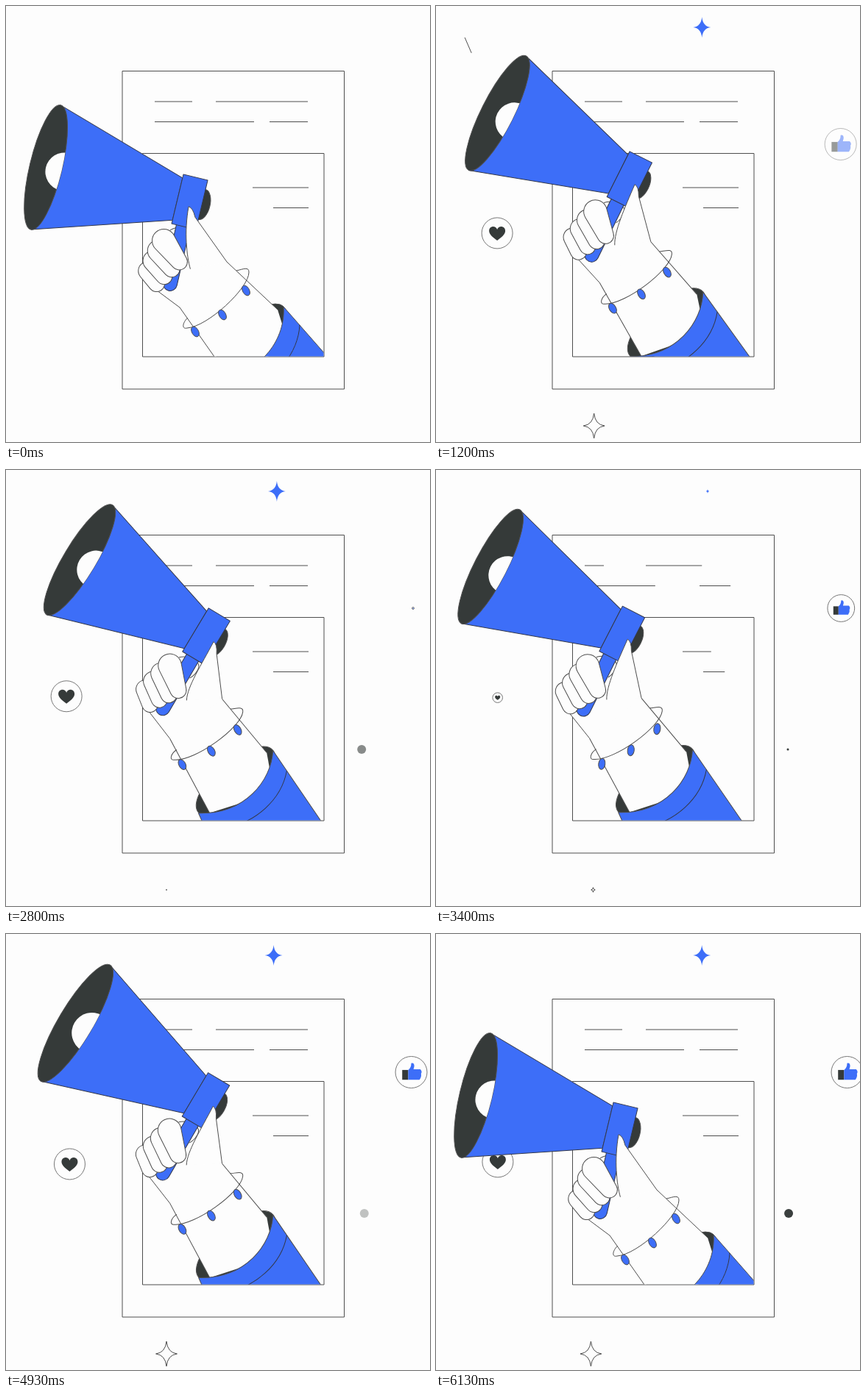
These frames come from a looping animation (576 px wide and 593 px high, 6.19 s). An HTML page with a canvas:

```html
<!DOCTYPE html>
<html lang="en">
<head>
<meta charset="utf-8">
<title>Announcement</title>
<style>
html, body { margin: 0; width: 100%; height: 100%; overflow: hidden; background: #fdfdfd; }
canvas { display: block; }
</style>
</head>
<body>
<canvas id="stage" width="576" height="593"></canvas>
<script>
const ctx = document.getElementById('stage').getContext('2d');
const LOOP = 6190, STEP = 200 / 3, TAU = Math.PI * 2, RAD = Math.PI / 180;
const BG = '#fdfdfd', LINE = '#4e4e4e', DARK = '#353a39', BLUE = '#3d6ef8', INK = '#33384a';

// Megaphone x, y, angle and forearm x, y, angle
const REST = [241, 229, 0, 294, 420, 0];
const LOW = [263, 198, 13.2, 279, 392, 5.5];
const HIGH = [287, 183, 20, 284, 377, 7.5];
// Lift over time: 0 at rest, 1 low, 2 high
const LIFT = [[270, 0], [1150, 1], [2200, 2], [3400, 1.06], [3800, 1.06], [5400, 1.6], [6100, 0]];
const SHOUTS = [900, 1750, 4130, 5000];

// Each icon fades in at start, drifts by dx, dy (furthest at peak) and shrinks away around gap
const ICONS = [
  { shape: blueStar, x: 365, y: 29, r: 14, dx: 4, dy: 0, period: 5000, peak: 3400, start: 270, gap: 3650, width: 900 },
  { shape: lineStar, x: 214, y: 571, r: 17, dx: 4, dy: 0, period: 2100, peak: 4930, start: 270, gap: 2980, width: 1500 },
  { shape: heart, x: 84, y: 310, r: 21, dx: 2.5, dy: 3, period: 5200, peak: 4800, start: 270, gap: 3698, width: 785 },
  { shape: thumbUp, x: 554, y: 188, r: 21.5, dx: 4.5, dy: 0, period: 1930, peak: 2250, start: 900, gap: 2640, width: 1000 },
  { shape: dot, x: 483, y: 380, r: 6, dx: 5, dy: 0, period: 2450, peak: 2200, start: 1500, gap: 3609, width: 635 }
];

// x, y, width
const TEXT_LINES = [
  [202, 130, 51], [285, 130, 125], [202, 157.5, 135],
  [358, 157.5, 52], [335, 247, 76], [363, 274.5, 48]
];

const clamp = v => Math.max(0, Math.min(1, v));
const smooth = v => { const u = clamp(v); return u * u * (3 - 2 * u); };
const bump = (t, centre, width) => Math.exp(-(((t - centre) / width) ** 2));
const wave = (t, peak, period) => Math.cos(TAU * (t - peak) / period);

function liftAt(t) {
  return LIFT.slice(1).reduce((v, [end, to], i) => {
    const [from, was] = LIFT[i];
    return v + (to - was) * smooth((t - from) / (end - from));
  }, 0);
}

// Quadratic path through the three poses
function poseAt(lift) {
  const a = (1 - lift) * (2 - lift) / 2, b = lift * (2 - lift), c = lift * (lift - 1) / 2;
  return REST.map((v, i) => a * v + b * LOW[i] + c * HIGH[i]);
}

function paint(fill, stroke = LINE) {
  if (fill) { ctx.fillStyle = fill; ctx.fill(); }
  if (stroke) { ctx.strokeStyle = stroke; ctx.stroke(); }
}

function ellipse(x, y, rx, ry, angle = 0) {
  ctx.beginPath();
  ctx.ellipse(x, y, rx, ry, angle, 0, TAU);
}

function poly(points) {
  ctx.beginPath();
  points.forEach(p => ctx.lineTo(...p));
}

function curve(start, ...beziers) {
  ctx.beginPath();
  ctx.moveTo(...start);
  beziers.forEach(b => ctx.bezierCurveTo(...b));
}

function capsule(x1, y1, r1, x2, y2, r2) {
  const a = Math.atan2(y2 - y1, x2 - x1);
  const off = Math.acos((r1 - r2) / Math.hypot(x2 - x1, y2 - y1));
  ctx.beginPath();
  ctx.arc(x1, y1, r1, a + off, a - off + TAU);
  ctx.arc(x2, y2, r2, a - off, a + off);
  ctx.closePath();
}

// A rigid part: maps points and draws in its own space
function part(x, y, deg) {
  const a = deg * RAD, c = Math.cos(a), s = Math.sin(a);
  return {
    a,
    at: (px, py) => [x + px * c - py * s, y + px * s + py * c],
    draw(fn) {
      ctx.save();
      ctx.translate(x, y);
      ctx.rotate(a);
      fn();
      ctx.restore();
    }
  };
}

function star(r) {
  const w = r * .85, c = r * .09;
  ctx.beginPath();
  ctx.moveTo(0, -r);
  ctx.quadraticCurveTo(c, -c, w, 0);
  ctx.quadraticCurveTo(c, c, 0, r);
  ctx.quadraticCurveTo(-c, c, -w, 0);
  ctx.quadraticCurveTo(-c, -c, 0, -r);
  ctx.closePath();
}

function blueStar(r) { star(r); paint(BLUE, null); }
function lineStar(r) { star(r); paint(null); }

function dot(r, t) {
  ctx.globalAlpha *= .65 + .35 * wave(t, 3565, 2730);
  ellipse(0, 0, r, r);
  paint(DARK, null);
}

function badge(r) {
  ellipse(0, 0, r, r);
  paint(BG, '#777');
  ctx.scale(r / 21, r / 21);
}

function heart(r) {
  badge(r);
  curve([0, 10], [-5, 6, -11, 2, -11, -3], [-11, -10, -2, -11, 0, -5],
    [2, -11, 11, -10, 11, -3], [11, 2, 5, 6, 0, 10]);
  paint(DARK, null);
}

function thumbUp(r) {
  badge(r);
  ctx.fillStyle = DARK;
  ctx.fillRect(-12, -3, 8, 13);
  ctx.beginPath();
  ctx.moveTo(-4, -3);
  ctx.quadraticCurveTo(0, -6, 0, -12);
  ctx.quadraticCurveTo(4, -13, 4, -8);
  ctx.lineTo(3, -4);
  ctx.lineTo(12, -4);
  ctx.quadraticCurveTo(15, -1, 13, 2);
  ctx.quadraticCurveTo(14, 6, 11, 10);
  ctx.lineTo(-4, 10);
  ctx.closePath();
  paint(BLUE, null);
}

function drawPaper(t) {
  ctx.strokeStyle = LINE;
  ctx.strokeRect(158, 88.5, 301.5, 432.5);
  ctx.strokeRect(185.5, 200.5, 246.5, 276.5);
  TEXT_LINES.forEach(([x, y, w], i) => {
    const late = t - i % 4 * 50;
    const shown = 1 - clamp((late - 3155) / 500) + clamp((late - 3700) / 250);
    poly([[x, y], [x + w * shown, y]]);
    if (shown > 0) paint(null);
  });
}

function drawIcons(t) {
  for (const { shape, x, y, r, dx, dy, period, peak, start, gap, width } of ICONS) {
    const size = r * smooth(Math.abs(t - gap) / width);
    const alpha = clamp((t - start) / 600);
    if (size < .3 || !alpha) continue;
    const drift = wave(t, peak, period);
    ctx.save();
    ctx.globalAlpha = alpha;
    ctx.translate(x + dx * drift, y + dy * drift);
    shape(size, t);
    ctx.restore();
  }
}

function drawForearm(charm) {
  ellipse(38, 37, 66, 28, -47 * RAD);
  paint(DARK);
  poly([[6, -72], [75, -7], [85, 25], [60, 60], [8, 84], [-58, -10]]);
  paint(BG, null);
  poly([[6, -72], [75, -7]]);
  paint(null);
  poly([[-58, -10], [8, 84]]);
  paint(null);

  curve([83, -11], [86, 30, 56, 80, -7, 86]);
  ctx.lineTo(53, 186);
  ctx.lineTo(233, 160);
  ctx.closePath();
  paint(BLUE);
  curve([105, 14], [103, 50, 76, 92, 15, 108]);
  paint(null, INK);

  curve([-47, 4], [-54, 10, -56, 20, -48, 18], [-20, 16, 36, -36, 36, -58], [36, -66, 28, -62, 19, -60]);
  paint(null);
  for (const [x, y] of [[-37, 23], [0, 0], [32, -33]]) {
    ellipse(x, y, 7.5, 4.5, charm);
    paint(BLUE);
  }
}

function drawMegaphone(k) {
  ellipse(34, 34, 11, 21);
  paint(DARK);
  // skin between index finger and thumb
  curve([0, 78], [8, 70, 26, 66, 30, 76], [32, 82, 30, 90, 27, 95]);
  paint(BG);
  capsule(16, 60, 9.5, 17, 149, 9.5);
  paint(BLUE, INK);

  const bx = -184 * (1 + k / 2), grow = 1 + k, ry = 87 * grow;
  poly([[0, 5], [bx + 5, 34 - ry * .98], [bx, 34 + ry], [0, 64]]);
  ctx.closePath();
  paint(BLUE, INK);
  ellipse(bx, 34, 22 * grow, ry);
  paint(DARK);
  ctx.save();
  ctx.clip();
  ellipse(bx + 26, 34, 26 * grow, 26 * grow);
  paint(BG, null);
  ctx.restore();

  ctx.beginPath();
  ctx.rect(0, 0, 34, 69);
  paint(BLUE, INK);
}

function drawFingers() {
  for (let i = 0; i < 4; i++) {
    capsule(-17 + 4 * i, 139 - 15 * i, 12.5 + 1.1 * i, -1 + 7.7 * i, 153 - 12 * i, 11);
    paint(BG);
  }
}

function drawThumb(mega, x, y, wrist) {
  const { at } = mega;
  curve(at(39, 123), [...at(30, 107), ...at(x + 2, y + 35), ...at(x, y)]);
  ctx.quadraticCurveTo(...at(x + 6, y), ...at(x + 12, y + 12));
  ctx.lineTo(...wrist);
  paint(BG);
}

function drawRays(t, mega, k) {
  const [cx, cy] = mega.at(-184 * (1 + k / 2), 34);
  for (const start of SHOUTS) {
    const u = (t - start - 60) / 330;
    if (u <= 0 || u >= 1) continue;
    [40, 13, -13, -40].forEach((deg, i) => {
      const v = u + (i ? .3 : 0);
      if (v >= 1) return;
      const a = mega.a + Math.PI + deg * RAD;
      const tail = 70 + 42 * clamp(2 * v - 1), head = 70 + 42 * clamp(v * 1.5);
      poly([tail, head].map(d => [cx + d * Math.cos(a), cy + d * Math.sin(a)]));
      paint(null);
    });
  }
}

function drawFigure(t) {
  const [mx, my, turn, fx, fy, bend] = poseAt(liftAt(t));
  const shake = bump(t, 3400, 300);
  const mega = part(mx - 11 * shake, my - 11.5 * shake, 13.4 + turn);
  const arm = part(fx - 14 * shake, fy - 9.5 * shake, bend + shake);
  const k = SHOUTS.reduce((sum, s) => sum + .115 * bump(t, s, 80), 0);
  const tipX = 17 + .7 * turn, tipY = 41 - .3 * turn;
  const wrist = arm.at(6, -72), heel = arm.at(-58, -10), grip = mega.at(-3, 160);

  ctx.save();
  ctx.beginPath();
  ctx.rect(-10, -10, 441.5, 486.5);
  ctx.clip();
  arm.draw(() => drawForearm((60 + 38 * shake) * RAD - arm.a));
  poly([mega.at(-5, 94), mega.at(tipX, tipY), wrist, heel, grip]);
  paint(BG, null);
  poly([grip, heel]);
  paint(null);
  mega.draw(() => { drawMegaphone(k); drawFingers(); });
  drawThumb(mega, tipX, tipY, wrist);
  ctx.restore();
  drawRays(t, mega, k);
}

// The picture advances 15 times a second after a short hold
function stepped(t) {
  let n = Math.floor((t - 196) / STEP);
  if (Math.round((200 + n * STEP) / 10) * 10 > t) n--;
  return n < 1 ? 0 : 200 + n * STEP;
}

const begin = performance.now();
function frame() {
  const t = stepped((performance.now() - begin) % LOOP);
  ctx.fillStyle = BG;
  ctx.fillRect(0, 0, 576, 593);
  ctx.lineWidth = 1;
  ctx.lineJoin = 'round';
  drawPaper(t);
  drawIcons(t);
  drawFigure(t);
  requestAnimationFrame(frame);
}
frame();
</script>
</body>
</html>
```
